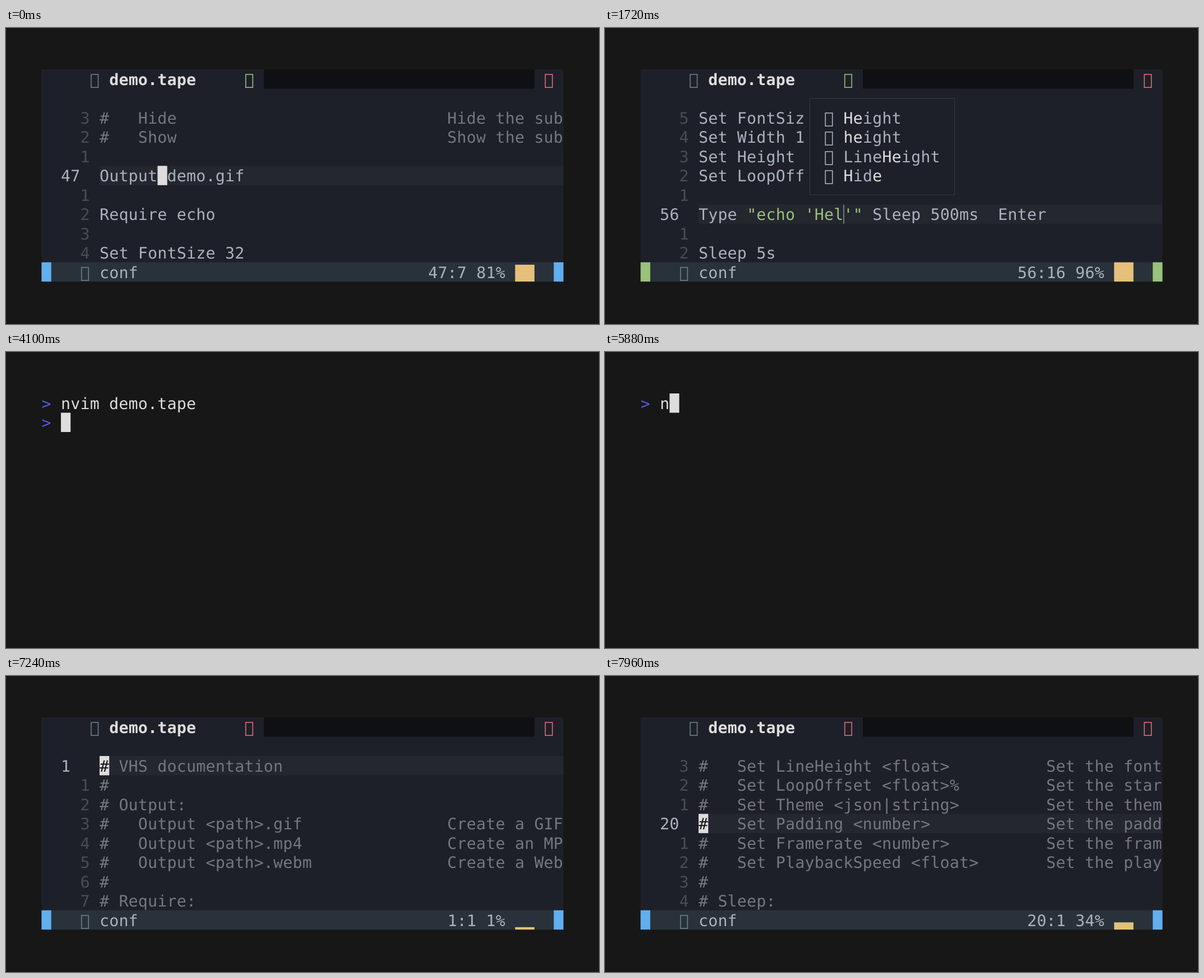
An HTML page that plays this animation: 1058x529 px, repeating every 8 s.

```html
<!DOCTYPE html>
<html lang="en">
<head>
<meta charset="utf-8">
<title>Terminal editor session</title>
<style>
  html, body { margin: 0; width: 100%; height: 100%; overflow: hidden; background: #171717; }
  #stage { display: block; background: #171717; }
  #stage text {
    font: 28.2px "DejaVu Sans Mono", monospace;
    letter-spacing: .262px;
    text-rendering: geometricPrecision;
    white-space: pre;
  }
  #stage text.bold { font-weight: bold; }
</style>
</head>
<body>
<svg id="stage" width="1058" height="529" viewBox="0 0 1058 529"></svg>
<script>
const LOOP = 8000;
const LEFT = 63.48, TOP = 74.06, CELL = 17.242, ROW = 34.466, COLS = 54;
const BASELINE = 27.9, HAIRLINE = .88;
const MISSING_GLYPH = '\u{F0219}';
const C = {
  screen: '#171717', panel: '#1e2029', tabs: '#0f1014', cursorLine: '#25272f', status: '#29323a',
  text: '#abb2bf', comment: '#747780', number: '#494c57', white: '#dddddd', icon: '#6d8086',
  green: '#98c379', red: '#e06c75', blue: '#61afef', yellow: '#e5c07b', border: '#3b3e47', prompt: '#5a56e0'
};

const doc = (usage, help = '') => '#   ' + usage.padEnd(32) + help;
const setting = (usage, help) => doc('Set ' + usage, 'Set the ' + help);
const FILE_HEAD = [
  '# VHS documentation', '#', '# Output:',
  doc('Output <path>.gif', 'Create a GIF output'),
  doc('Output <path>.mp4', 'Create an MP4 output'),
  doc('Output <path>.webm', 'Create a WebM output'),
  '#', '# Require:', doc('Require <string>', 'Ensure a program'), '#', '# Settings:',
  setting('FontSize <number>', 'font size'), setting('FontFamily <string>', 'font family'),
  setting('Height <number>', 'height'), setting('Width <number>', 'width'),
  setting('LetterSpacing <float>', 'font spacing'), setting('LineHeight <float>', 'font height'),
  setting('LoopOffset <float>%', 'starting frame'), setting('Theme <json|string>', 'theme'),
  setting('Padding <number>', 'padding'), setting('Framerate <number>', 'framerate'),
  setting('PlaybackSpeed <float>', 'playback speed'), '#', '# Sleep:'
];
const FILE_TAIL = [
  doc('Hide', 'Hide the subsequent'), doc('Show', 'Show the subsequent'), '',
  'Output demo.gif', '', 'Require echo', '',
  'Set FontSize 32', 'Set Width 1200', 'Set Height 600', 'Set LoopOffset 50%', '',
  '', '', 'Sleep 5s'
];
const TAIL_START = 44, LAST = 58, TYPE_LINE = 56;

function lineText(n, say) {
  if (n === TYPE_LINE) return `Type "echo '${say}'" Sleep 500ms  Enter`;
  return (n < TAIL_START ? FILE_HEAD[n - 1] : FILE_TAIL[n - TAIL_START]) || '';
}

// Timeline: each entry changes part of the state at a time
const steps = [];
const at = (time, change) => steps.push({ time, change });
const move = (time, line, col, lag = 20) => {
  at(time, { line, col });
  at(time + lag, { ruler: [line, col] });
};

at(0, { view: 'edit', mode: 'n', line: 47, col: 7, ruler: [47, 7], say: 'Welcome to VHS!',
  saved: false, menu: '', command: null, shell: [], cursor: [0, 0] });
for (let i = 0; i < 9; i++) {
  const line = 48 + i;
  move(500 + 65 * i, line, lineText(line, '') ? 7 : 1);
}
[12, 13, 21, 24].forEach((col, i) => move(1085 + 65 * i, TYPE_LINE, col, 0));

const WORDS = 'Hello users';
at(1360, { mode: 'i', say: '', col: 13, ruler: [TYPE_LINE, 13] });
for (let i = 1; i <= WORDS.length; i++) {
  const time = 1610 + 49 * (i - 1), say = WORDS.slice(0, i);
  at(time, { say, col: 13 + i, ruler: [TYPE_LINE, 13 + i] });
  at(time + 24, { menu: i < 3 ? say : '' });
}
at(2220, { mode: 'n', col: 23, ruler: [TYPE_LINE, 23] });
[':', ':w', ':wq'].forEach((command, i) => at(3060 + 60 * i, { command }));

const LAUNCH = 'nvim demo.tape';
at(4060, { command: null, saved: true });
at(4080, { view: 'shell', shell: [LAUNCH], cursor: [1, 0] });
at(4100, { shell: [LAUNCH, ''], cursor: [1, 2] });
for (let i = 1; i <= LAUNCH.length; i++) {
  at(5880 + Math.round(50.7 * (i - 1)), { shell: [LAUNCH.slice(0, i)], cursor: [0, 2 + i] });
}
at(7040, { cursor: [1, 0] });
at(7060, { view: 'blank' });
at(7140, { view: 'panel' });
at(7180, { view: 'edit', line: 1, col: 1, ruler: [1, 1] });
for (let line = 6; line <= 20; line++) {
  move(Math.floor(7500 + 51 * (line - 11)), line, 1, line === 20 ? 0 : 20);
}

steps.sort((a, b) => a.time - b.time);
let state = {};
const timeline = steps.map(({ time, change }) => ({ time, state: state = { ...state, ...change } }));

// Drawing on the character grid
let svg = '';
const escapeText = s => s.replace(/&/g, '&amp;').replace(/</g, '&lt;');
const x = col => LEFT + col * CELL;
const y = row => TOP + row * ROW;

function box(left, top, width, height, color, border = 'none') {
  svg += `<rect x="${left}" y="${top}" width="${width}" height="${height}"
    fill="${color}" stroke="${border}" stroke-width="${HAIRLINE}"/>`;
}
const fill = (row, col, cols, color, rows = 1) => box(x(col), y(row), cols * CELL, rows * ROW, color);
function text(row, col, string, color, name = '') {
  if (!string) return;
  svg += `<text class="${name}" x="${x(col)}" y="${y(row) + BASELINE}" fill="${color}">${escapeText(string)}</text>`;
}
const icon = (row, col, color) => text(row, col, MISSING_GLYPH, color);
function blockCursor(row, col, char = '') {
  fill(row, col, 1, C.white);
  text(row, col, char.trim(), C.screen);
}

function drawShell({ shell, cursor }) {
  shell.forEach((command, row) => {
    text(row, 0, '>', C.prompt);
    text(row, 2, command, C.white);
  });
  blockCursor(...cursor);
}

function drawTabs(saved) {
  icon(0, 5, C.icon);
  text(0, 7, 'demo.tape', C.white, 'bold');
  icon(0, 21, saved ? C.red : C.green);
  fill(0, 23, 28, C.tabs);
  icon(0, 52, C.red);
}

function drawLine(row, string) {
  const visible = string.slice(0, COLS - 6);
  const quoted = visible.match(/"[^"]*"/);
  if (!quoted || string[0] === '#') {
    text(row, 6, visible, string[0] === '#' ? C.comment : C.text);
    return;
  }
  const end = quoted.index + quoted[0].length;
  text(row, 6, visible.slice(0, quoted.index), C.text);
  text(row, 6 + quoted.index, quoted[0], C.green);
  text(row, 6 + end, visible.slice(end), C.text);
}

function drawBuffer({ line, col, say, mode, command }) {
  const first = Math.max(1, Math.min(line - 3, LAST - 7));
  for (let i = 0; i < 8; i++) {
    const n = first + i, row = 2 + i, string = lineText(n, say);
    if (n === line) {
      fill(row, 6, COLS - 6, C.cursorLine);
      text(row, 2, String(n), C.text);
    } else {
      text(row, 4, String(Math.abs(n - line)), C.number);
    }
    drawLine(row, string);
    if (n !== line || command !== null) continue;
    if (mode === 'i') box(x(5 + col), y(row), HAIRLINE, ROW, C.white);
    else blockCursor(row, 5 + col, string[col - 1]);
  }
}

function drawMenu(typed) {
  fill(1, 17, 16, C.panel, 6);
  box(x(17.5), y(1.5), 15 * CELL, 5 * ROW, C.panel, C.border);
  ['Height', 'height', 'LineHeight', 'Hide'].forEach((item, i) => {
    const row = 2 + i;
    let hit = 0;
    icon(row, 19, C.text);
    [...item].forEach((char, k) => {
      const match = hit < typed.length && char.toLowerCase() === typed[hit].toLowerCase();
      if (match) hit++;
      text(row, 21 + k, char, match ? C.white : C.text);
    });
  });
}

function drawStatus({ mode, ruler: [line, col] }) {
  const accent = mode === 'i' ? C.green : C.blue;
  fill(10, 0, COLS, C.status);
  fill(10, 0, 1, accent);
  fill(10, COLS - 1, 1, accent);
  icon(10, 4, C.icon);
  text(10, 6, 'conf', C.text);
  const position = `${line}:${col} ${Math.floor(line / LAST * 100)}%`;
  text(10, 48 - position.length, position, C.text);
  const level = (Math.floor((line - 1) / LAST * 8) + 1) / 8;
  fill(11 - level, 49, 2, C.yellow, level);
}

function render(s) {
  svg = '';
  if (s.view === 'shell') drawShell(s);
  if (s.view === 'edit' || s.view === 'panel') fill(0, 0, COLS, C.panel, 11);
  if (s.view === 'edit') {
    drawTabs(s.saved);
    drawBuffer(s);
    if (s.menu) drawMenu(s.menu);
    if (s.command === null) {
      drawStatus(s);
    } else {
      text(10, 0, s.command, C.text);
      blockCursor(10, s.command.length);
    }
  }
  document.getElementById('stage').innerHTML = svg;
}

let shown = -1;
function tick() {
  const time = performance.now() % LOOP;
  let index = timeline.length - 1;
  while (index > 0 && timeline[index].time > time) index--;
  if (index !== shown) render(timeline[shown = index].state);
  requestAnimationFrame(tick);
}
tick();
</script>
</body>
</html>
```
